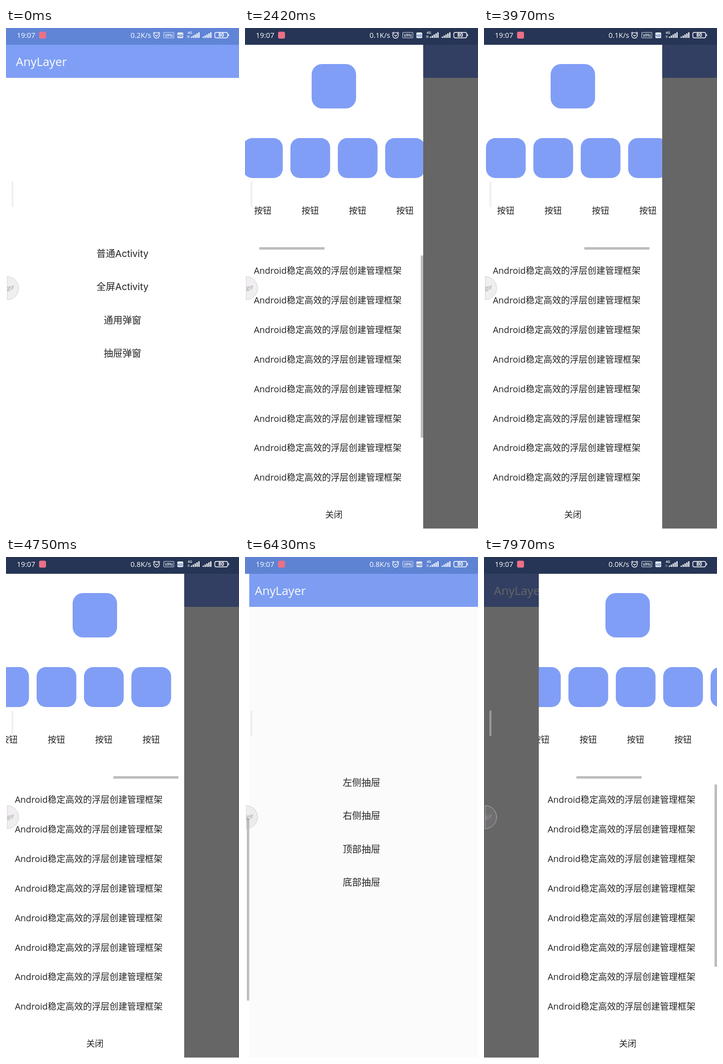
These frames come from a looping animation (472 by 1015 pixels, 8000 ms). An HTML page with a canvas:

```html
<!DOCTYPE html>
<html lang="zh-CN">
<head>
<meta charset="utf-8">
<title>AnyLayer</title>
<style>
html, body { margin: 0; width: 100%; height: 100%; overflow: hidden; background: #fff; }
canvas { display: block; }
</style>
</head>
<body>
<canvas id="stage" width="472" height="1015"></canvas>
<script>
const ctx = document.getElementById('stage').getContext('2d');
const LOOP = 8000, W = 472, H = 1015, DRAWER = 361;
const CJK = '"Noto Sans CJK SC", "Noto Sans CJK", sans-serif';
const SANS = '"Open Sans", ' + CJK, INTER = 'Inter, ' + CJK;
const PRIMARY = '#7e9ff5', DARK = '#6085d6', ICON = '#819ef6', INK = '#222';
const MAIN_MENU = ['普通Activity', '全屏Activity', '通用弹窗', '抽屉弹窗'];
const DRAWER_MENU = ['左侧抽屉', '右侧抽屉', '顶部抽屉', '底部抽屉'];

// The screen refreshes in bursts: [start, end, number of refreshes]
const BURSTS = [[0, 0, 1], [190, 880, 8], [1260, 1650, 5], [2420, 3200, 9], [3300, 3500, 3],
  [3680, 3680, 1], [3970, 4750, 9], [4850, 5650, 9], [5750, 5950, 3], [6240, 6630, 5],
  [7010, 7410, 5], [7690, 7690, 1], [7910, 7970, 2]];

function refreshTime(t) {
  const [start, end, n] = BURSTS.filter(b => b[0] <= t).pop();
  if (t >= end) return end;
  const step = (end - start) / (n - 1);
  return start + Math.floor((t - start + 6) / step) * step;
}

// Linear interpolation through [time, value] pairs, held at both ends
function track(t, keys) {
  const i = keys.findIndex(k => k[0] > t);
  if (i < 0) return keys[keys.length - 1][1];
  if (i === 0) return keys[0][1];
  const [t0, v0] = keys[i - 1], [t1, v1] = keys[i];
  return v0 + (v1 - v0) * (t - t0) / (t1 - t0);
}

const easeOut = (t, start, length, power = 2) =>
  1 - (1 - Math.min(1, Math.max(0, (t - start) / length))) ** power;

function rect(x, y, w, h, color) {
  ctx.fillStyle = color;
  ctx.fillRect(x, y, w, h);
}

function round(x, y, w, h, r, color, outline) {
  ctx.beginPath();
  ctx.roundRect(x, y, w, h, r);
  ctx.fillStyle = ctx.strokeStyle = color;
  outline ? ctx.stroke() : ctx.fill();
}

function text(str, x, y, font, color, align = 'left') {
  ctx.font = font;
  ctx.fillStyle = color;
  ctx.textAlign = align;
  ctx.fillText(str, x, y);
}

function clipped(x, y, w, h, draw) {
  ctx.save();
  ctx.beginPath();
  ctx.rect(x, y, w, h);
  ctx.clip();
  draw();
  ctx.restore();
}

function page(x, items) {
  rect(x, 0, W, H, '#fff');
  rect(x, 0, W, 34, DARK);
  rect(x, 34, W, 67, PRIMARY);
  text('AnyLayer', x + 20, 77, '500 24px ' + SANS, '#fff');
  items.forEach((s, i) => text(s, x + 236, 464 + i * 67.4, '19px ' + INTER, INK, 'center'));
}

function bar(x, y, w, h, alpha) {
  rect(x, y, w, h, `rgba(0,0,0,${0.26 * alpha})`);
}

function drawer(x, { scrollX, scrollY, barX, barY }) {
  clipped(x, 34, DRAWER, 980, () => {
    rect(x, 34, DRAWER, 980, '#fff');
    round(x + 135, 73, 90, 90, 21, ICON);
    for (let i = 0; i < 9; i++) {
      const left = x + 26 + i * 96 - scrollX;
      round(left, 223, 80.5, 81, 19, ICON);
      text('按钮', left + 40, 376, '17.6px ' + SANS, INK, 'center');
    }
    bar(x + 18 + scrollX * 0.369, 444, 132, 5, barX);
    text('关闭', x + 180, 991.5, '17.6px ' + SANS, INK, 'center');
  });
  clipped(x, 461, DRAWER, 493, () => {
    for (let i = 0; i < 11; i++)
      text('Android稳定高效的浮层创建管理框架', x + 18, 498 + i * 59.9 - scrollY, '17.9px ' + SANS, INK);
    bar(x + 356, 461 + scrollY * 0.747, 5, 369, barY);
  });
}

function signal(x) {
  for (let i = 0; i < 5; i++) rect(x + i * 3.8, 17.5 - i * 2.2, 2.4, 2.5 + i * 2.2, '#fff');
}

function statusBar(t) {
  const speed = t < 650 ? '0.2' : t < 4270 ? '0.1' : t < 7900 ? '0.8' : '0.0';
  text('19:07', 22, 20, '500 14.6px ' + SANS, '#fff');
  round(67, 7.5, 14, 14, 3, '#ec7088');
  text(speed + 'K/s', 294, 20, '500 14.6px ' + SANS, '#fff', 'right');

  ctx.lineWidth = 1.3;
  ctx.strokeStyle = '#fff';
  ctx.beginPath();
  ctx.arc(305, 15, 5.7, 0, 7);
  ctx.moveTo(302.5, 14);
  ctx.lineTo(305, 16.5);
  ctx.lineTo(308, 14);
  ctx.moveTo(298, 11);
  ctx.lineTo(301.5, 8);
  ctx.moveTo(312, 11);
  ctx.lineTo(308.5, 8);
  ctx.stroke();

  ctx.lineWidth = 1;
  round(319.5, 9, 20.5, 11, 0.5, '#dfe6f8', true);
  text('VPN', 329.8, 17.5, '600 8px ' + SANS, '#fff', 'center');
  round(347, 9, 12, 11.5, 2, '#e6ecfa');
  text('HD', 353, 18, '700 7.5px ' + SANS, '#5470b0', 'center');
  text('4G', 368, 12, '600 7px ' + SANS, '#fff');
  rect(367.5, 15, 1, 5, t < 3680 ? '#fff' : 'rgba(255,255,255,.45)');
  rect(370, 15, 1, 5, t < 7690 ? '#fff' : 'rgba(255,255,255,.45)');
  signal(374.5);
  signal(398.5);
  ctx.lineWidth = 1.4;
  round(423, 9, 26, 11, 3, '#fff', true);
  rect(450.3, 12.5, 1.5, 4, '#fff');
  text('80', 436, 18.2, '700 10px ' + SANS, '#fff', 'center');
}

function floatingWidgets() {
  rect(11, 311, 4, 52, 'rgba(220,220,220,.44)');
  clipped(2, 500, 26, 54, () => {
    ctx.beginPath();
    ctx.arc(2, 527, 23.5, 0, 7);
    ctx.fillStyle = 'rgba(160,150,160,.16)';
    ctx.fill();
    ctx.lineWidth = 1;
    ctx.strokeStyle = 'rgba(200,195,200,.8)';
    ctx.stroke();
    rect(2, 503.5, 1, 47, 'rgba(200,195,200,.6)');
  });
  text('gif', 2.5, 530, '11.5px ' + SANS, '#999');
}

function draw(t) {
  const slide = easeOut(t, 280, 560, 3);
  if (slide < 1) page(-W * 0.25 * slide, MAIN_MENU);
  if (slide > 0) page(W * (1 - slide), DRAWER_MENU);

  const left = easeOut(t, 1230, 330) - easeOut(t, 6180, 302);
  const right = easeOut(t, 6980, 330);
  rect(0, 0, W, 1014, `rgba(0,0,0,${0.6 * Math.max(left, right)})`);

  if (left > 0) drawer(DRAWER * (left - 1), {
    scrollX: track(t, [[2320, 0], [2420, 30], [2700, 210], [2950, 380], [3200, 470],
      [3870, 470], [3970, 502], [4170, 540]]),
    scrollY: track(t, [[4750, 0], [5450, 110], [5650, 125], [5950, 92]]),
    barX: track(t, [[3200, 1], [3500, 0], [3870, 0], [3970, 1], [4750, 1], [5150, 0]]),
    barY: track(t, [[2460, 1], [2710, 0], [4750, 0], [4850, 1]])
  });
  if (right > 0) drawer(W - DRAWER * right, {
    scrollX: track(t, [[7810, 0], [7910, 70], [7970, 158]]),
    scrollY: 0, barX: 1, barY: 1
  });

  statusBar(t);
  floatingWidgets();
}

const began = performance.now();
function tick() {
  draw(refreshTime((performance.now() - began) % LOOP));
  requestAnimationFrame(tick);
}
tick();
</script>
</body>
</html>
```
